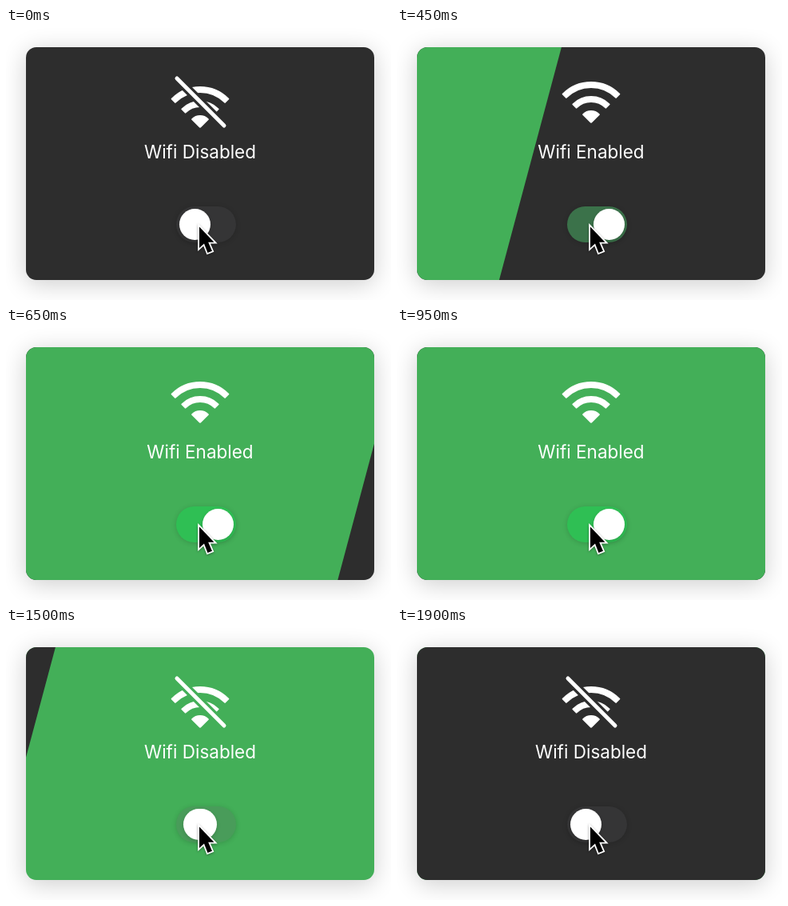
An HTML page for the animation above (2100 ms loop, 482 px wide and 340 px high).

```html
<!DOCTYPE html>
<html>
<head>
<meta charset="utf-8">
<style>
  html, body { margin: 0; width: 100%; height: 100%; overflow: hidden; background: #fff; }
  div, svg { position: absolute; }
  #card { left: 25px; top: 24px; width: 436px; height: 290.5px; border-radius: 13px;
    overflow: hidden; box-shadow: 0 5px 30px rgba(0,0,0,.2); }
  #wave { inset: 0; }
  #toggle { left: 213px; top: 223px; width: 75px; height: 45px; border-radius: 23px;
    box-shadow: 0 1px 6px rgba(0,0,0,.16); }
  #knob { top: 226px; height: 39px; border-radius: 20px; background: #fff;
    box-shadow: 0 2px 5px rgba(0,0,0,.15); }
  svg { left: 0; top: 0; }
  text { font: 22.5px Inter, "Liberation Sans", sans-serif; text-anchor: middle; fill: #fff; }
  #cursor { filter: drop-shadow(0 1px 1.5px rgba(0,0,0,.35)); }
</style>
</head>
<body>
<div id="card"><div id="wave"></div></div>
<div id="toggle"></div>
<div id="knob"></div>
<svg width="482" height="340">
  <defs>
    <path id="fan" fill="#fff" stroke="#fff" stroke-width="2" stroke-linejoin="round"/>
    <mask id="cut" maskUnits="userSpaceOnUse" x="0" y="0" width="482" height="340">
      <path d="M0 0H482V340H0Z" fill="#fff"/>
      <path d="M214 63L273 122" stroke="#000" stroke-width="11.5" stroke-linecap="round"/>
    </mask>
  </defs>
  <g id="on">
    <use href="#fan" x="243" y="118"/>
    <text x="243" y="163">Wifi Enabled</text>
  </g>
  <g id="off">
    <g mask="url(#cut)"><use href="#fan" x="243" y="124"/></g>
    <path d="M214 63L273 122" stroke="#fff" stroke-width="5" stroke-linecap="round"/>
    <text x="243" y="163">Wifi Disabled</text>
  </g>
  <path id="cursor" d="M242 248.5V275L248 269.5L252.5 281L258 278.7L253.2 267.8H260.5Z"
    stroke="#fff" stroke-width="3.6" paint-order="stroke"/>
</svg>
<script>
const $ = id => document.getElementById(id);
const LOOP = 2100, TURN = 1150;
const GREEN = '#43af58', DARK = '#2d2d2d';

// Ring section spanning 45 degrees either side of vertical
function sector(r0, r1) {
  const a = r0 * Math.SQRT1_2, b = r1 * Math.SQRT1_2;
  return `M${-a} ${-a}L${-b} ${-b}A${r1} ${r1} 0 0 1 ${b} ${-b}L${a} ${-a}A${r0} ${r0} 0 0 0 ${-a} ${-a}Z`;
}
$('fan').setAttribute('d', sector(44, 50) + sector(26, 32) + sector(0.5, 14));

function smooth(p, from, to) {
  const u = Math.min(1, Math.max(0, (p - from) / (to - from)));
  return u * u * (3 - 2 * u);
}
const mix = (a, b, k) => a + (b - a) * k;

function draw(t) {
  const turnOn = t < TURN, p = turnOn ? t : t - TURN;

  // Slanted wipe: steady sweep with a soft finish
  const edge = (p < 650 ? 1.44 * (p - 308) : 545 - 53 * Math.exp((650 - p) / 40)) - 25;
  $('card').style.background = turnOn ? DARK : GREEN;
  $('wave').style.background = turnOn ? GREEN : DARK;
  $('wave').style.clipPath =
    `polygon(-900px 0, ${edge}px 0, ${edge - 78}px 291px, -900px 291px)`;

  // The leading side of the knob runs ahead of the trailing one
  const lead = 29 * smooth(p, 140, 430), trail = 29 * smooth(p, 170, 450);
  const left = turnOn ? 217 + trail : 246 - lead;
  const right = turnOn ? 256 + lead : 285 - trail;
  $('knob').style.left = left + 'px';
  $('knob').style.width = right - left + 'px';

  const k = turnOn ? smooth(p, 200, 650) : 1 - smooth(p, 120, 420);
  $('toggle').style.background =
    `rgba(${mix(95, 47, k)}, ${mix(95, 191, k)}, ${mix(98, 84, k)}, ${mix(.16, 1, k)})`;

  const enabled = turnOn === p >= 200;
  $('on').style.display = enabled ? '' : 'none';
  $('off').style.display = enabled ? 'none' : '';
}

const start = performance.now();
function tick() {
  draw((performance.now() - start) % LOOP);
  requestAnimationFrame(tick);
}
tick();
</script>
</body>
</html>
```
